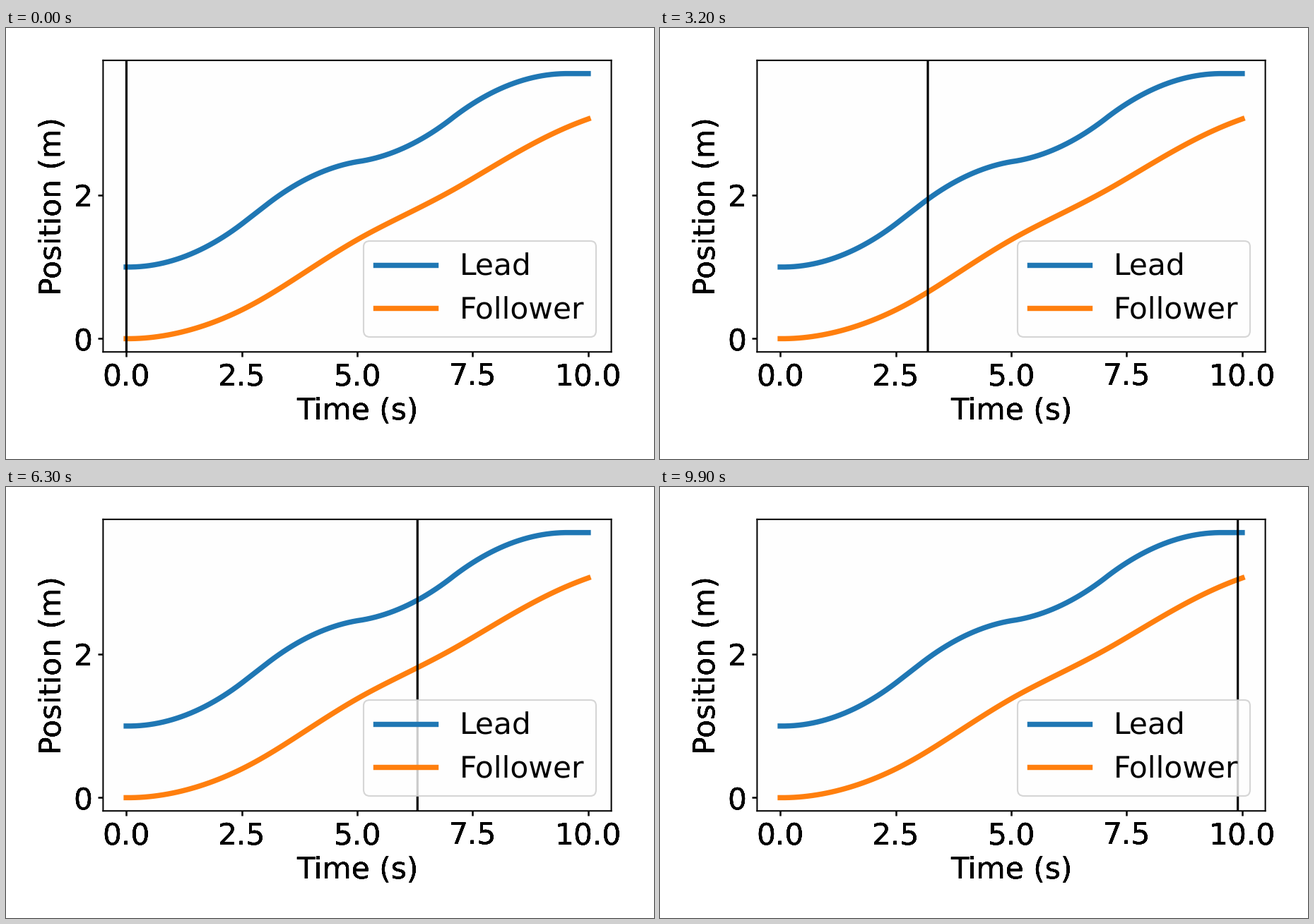
Recreate the animation shown at these times as a matplotlib script. Size 917x611 px, loop 10 s.

```python
import matplotlib.pyplot as plt
import numpy as np
from matplotlib.animation import FuncAnimation

W, H, DPI = 917, 611, 152.75
LEFT, RIGHT, TOP, BOTTOM = 137.4, 856.6, 45.85, 459.2
GRID = W / 1200  # the cursor moves on a slightly finer pixel grid
FRAMES, DT = 100, 0.1

plt.rcParams.update({
    "font.family": "DejaVu Sans",
    "font.size": 20,
    "text.hinting": "none",
    "axes.linewidth": 0.95,
    "xtick.major.width": 1.2,
    "ytick.major.width": 1.2,
    "lines.linewidth": 3.5,
})


def lead_speed(t):
    """Two speed bumps of height 0.5, the second starting from 0.1."""
    first = min(0.2 * t, 0.5, 0.2 * (5.5 - t))
    second = min(0.2 * (t - 4.5), 0.2 * (9.5 - t))
    return max(first, second, 0)


def simulate(kp=0.15, kv=0.42, headway=2.6):
    """Euler steps of a car that keeps a time headway to the one ahead."""
    lead, pos, speed = 1.0, 0.0, 0.0
    path = []
    for i in range(FRAMES + 1):
        path.append((i * DT, lead, pos))
        ahead = lead_speed(i * DT)
        accel = kp * (lead - pos - headway * speed) + kv * (ahead - speed)
        lead += ahead * DT
        pos += speed * DT
        speed += accel * DT
    return np.array(path).T


def harden(img, dpi):
    """Make soft text edges heavier."""
    out = img.copy()
    out[..., 3] = np.clip(img[..., 3] * 3, 0, 1)
    return out, 0, 0


fig = plt.figure(figsize=(6.0033, 4), dpi=DPI, facecolor="white")
ax = fig.add_axes([LEFT / W, 1 - BOTTOM / H, (RIGHT - LEFT) / W, (BOTTOM - TOP) / H])
ax.set_facecolor("#fefefe")

t, lead, follower = simulate()
ax.plot(t, lead, label="Lead")
ax.plot(t, follower, label="Follower")
cursor = ax.axvline(0, color="black", lw=1.5, snap=False)

ax.set_xticks(np.arange(0, 10.1, 2.5))
ax.set_yticks([0, 2])
ax.set_xlabel("Time (s)")
ax.set_ylabel("Position (m)")
ax.legend(loc="lower right")

for spine in ax.spines.values():
    spine.set_snap(False)
for text in [*ax.get_xticklabels(), *ax.get_yticklabels(),
             ax.xaxis.label, ax.yaxis.label]:
    text.set_agg_filter(harden)


def update(i):
    px, _ = ax.transData.transform((i * DT, 0))
    x, _ = ax.transData.inverted().transform((round(px / GRID) * GRID, 0))
    cursor.set_xdata([x, x])
    return [cursor]


anim = FuncAnimation(fig, update, frames=FRAMES, interval=100, repeat=True,
                     repeat_delay=0, blit=False)
plt.show()
```
